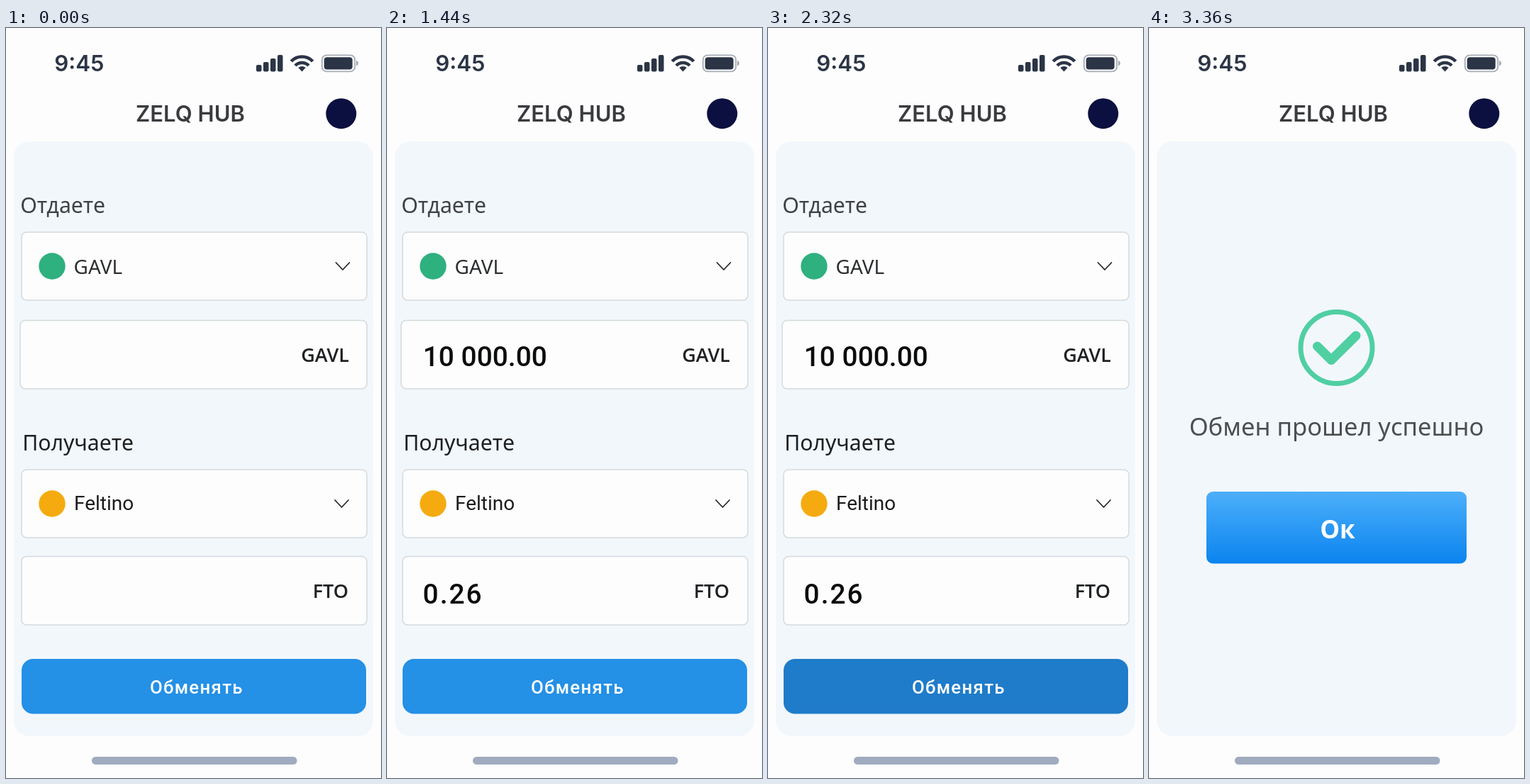
Write an HTML page that moves like this. It is 529 by 1058 pixels and loops after 4.88 s.

```html
<!DOCTYPE html>
<html lang="ru">
<head>
<meta charset="utf-8">
<title>Обмен</title>
<style>
  html, body { margin: 0; width: 100%; height: 100%; overflow: hidden; background: #fdfdfd; }
  svg { display: block; width: 100%; height: 100%; }
  text { white-space: pre; }
  .inter { font-family: Inter, sans-serif; font-weight: 600; }
  .noto { font-family: "Noto Sans", "Open Sans", sans-serif; }
  .open { font-family: "Open Sans", "Noto Sans", sans-serif; }
  .roboto { font-family: Roboto, sans-serif; }
  .semi { font-weight: 600; }
  .medium { font-weight: 500; }
  .field { fill: #fdfdfd; stroke: #d4dadd; stroke-width: 1.5; }
  .chevron { fill: none; stroke: #26282b; stroke-width: 1.8; stroke-linecap: round; stroke-linejoin: round; }
</style>
</head>
<body>
<svg viewBox="0 0 529 1058">
  <defs>
    <linearGradient id="okFill" x2="0" y2="1">
      <stop stop-color="#4daffa"/>
      <stop offset="1" stop-color="#0a84ef"/>
    </linearGradient>
  </defs>
  <rect width="529" height="1058" fill="#fdfdfd"/>

  <!-- status bar -->
  <g fill="#2b3546">
    <text class="inter" x="68.3" y="60.5" font-size="31.3">9:45</text>
    <rect x="353" y="52" width="7.5" height="9.5" rx="2"/>
    <rect x="363" y="48" width="7.5" height="13.5" rx="2"/>
    <rect x="373" y="43" width="7.5" height="18.5" rx="2"/>
    <rect x="383" y="38" width="7.5" height="23.5" rx="2"/>
    <path d="M417.5 61.5l-5.2-5.4a7.5 7.5 0 0 1 10.4 0z"/>
    <g fill="none" stroke="#2b3546" stroke-width="4.6">
      <path d="M402.3 47a21 21 0 0 1 30.4 0"/>
      <path d="M408 53a13.2 13.2 0 0 1 19 0"/>
    </g>
    <rect x="445.8" y="38.3" width="46.4" height="23" rx="6.5" fill="none" stroke="#a7acb5" stroke-width="1.8"/>
    <rect x="448.7" y="41.2" width="40" height="17.2" rx="4"/>
    <path d="M494 46q3 1 3 3.7t-3 3.7z" fill="#a7acb5"/>
  </g>

  <!-- header -->
  <text class="inter" x="260" y="132" font-size="31" text-anchor="middle" fill="#3a3b3f">ZELQ HUB</text>
  <circle cx="472.8" cy="120.7" r="21.5" fill="#0b1040"/>
  <rect x="11" y="160" width="507" height="839" rx="22" fill="#f2f7fc"/>
  <rect x="121" y="1028" width="289.5" height="11" rx="5.5" fill="#a0abc0"/>

  <g id="form">
    <text class="noto" x="20.3" y="260.5" font-size="30.2" fill="#3f4143">Отдаете</text>
    <rect class="field" x="22" y="288" width="487" height="96" rx="7"/>
    <circle cx="65" cy="336" r="18.7" fill="#2fb07f"/>
    <text class="noto" x="95.5" y="346.5" font-size="28" fill="#2c2e30">GAVL</text>
    <path class="chevron" d="M465.5 331l9.5 10 9.5-10"/>

    <rect class="field" x="20" y="412.5" width="489" height="96.5" rx="7"/>
    <text id="give" class="roboto medium" x="50.8" y="477" font-size="38.8" fill="#0b0c0d"></text>
    <text class="open semi" x="484" y="471" font-size="27" text-anchor="end" fill="#1f2123">GAVL</text>

    <text class="noto" x="23.2" y="595.5" font-size="30.2" fill="#1d1f21">Получаете</text>
    <rect class="field" x="22" y="623" width="487" height="96" rx="7"/>
    <circle cx="65" cy="671" r="18.7" fill="#f5ab0f"/>
    <text class="roboto" x="96" y="680" font-size="28" fill="#1b1c1e">Feltino</text>
    <path class="chevron" d="M464 666l9.5 10 9.5-10"/>

    <rect class="field" x="22" y="745.5" width="487" height="96.5" rx="7"/>
    <text id="get" class="roboto medium" x="50.6" y="811.5" font-size="38.8" letter-spacing="2" fill="#0b0c0d"></text>
    <text class="open semi" x="483" y="804" font-size="27" text-anchor="end" fill="#1f2123">FTO</text>

    <rect id="swap" x="22" y="890" width="486" height="77.5" rx="16"/>
    <text class="roboto medium" x="203" y="938.5" font-size="25.8" letter-spacing="1.3" fill="#fff">Обменять</text>
  </g>

  <g id="done">
    <circle cx="264.5" cy="451" r="50.5" fill="none" stroke="#50cfa2" stroke-width="7"/>
    <path d="M237.5 449l19.5 19.5 35-34.5" fill="none" stroke="#50cfa2" stroke-width="13" stroke-linecap="round" stroke-linejoin="round"/>
    <text class="noto" x="264.5" y="574.5" font-size="34.5" text-anchor="middle" fill="#4c4e50">Обмен прошел успешно</text>
    <rect x="81" y="654" width="367" height="101.5" rx="9" fill="url(#okFill)"/>
    <text class="noto semi" x="266" y="719.5" font-size="35" text-anchor="middle" fill="#fff">Ок</text>
  </g>
</svg>
<script>
  const LOOP = 4880, STEP = 80, DONE_AT = 3040;
  const IDLE = [36, 144, 230], PRESSED = [31, 124, 202];
  const byId = id => document.getElementById(id);
  const progress = (t, from, to) => Math.min(1, Math.max(0, (t - from) / (to - from)));

  // Splits a value into characters that fade in one after another.
  function typed(id, value, start, gap, fade) {
    const chars = [...value].map(char => {
      const span = document.createElementNS('http://www.w3.org/2000/svg', 'tspan');
      span.textContent = char;
      byId(id).append(span);
      return span;
    });
    return t => chars.forEach((span, i) => {
      const from = start + i * gap;
      span.setAttribute('fill-opacity', progress(t, from, from + fade));
    });
  }

  const typeGive = typed('give', '10 000.00', 20, 142, 140);
  const typeGet = typed('get', '0.26', 1240, 45, 60);

  const pressAmount = t => t < 2320
    ? progress(t, 1600, 2320) ** 1.5
    : 1 - progress(t, 2320, 2560);

  function draw(t) {
    typeGive(t);
    typeGet(t);
    const k = pressAmount(t);
    const color = IDLE.map((c, i) => Math.round(c + (PRESSED[i] - c) * k));
    byId('swap').setAttribute('fill', `rgb(${color})`);
    const done = t >= DONE_AT;
    byId('form').style.display = done ? 'none' : '';
    byId('done').style.display = done ? '' : 'none';
  }

  const begin = performance.now();
  function tick() {
    const t = (performance.now() - begin) % LOOP;
    draw(Math.floor(t / STEP) * STEP);
    requestAnimationFrame(tick);
  }
  tick();
</script>
</body>
</html>
```
